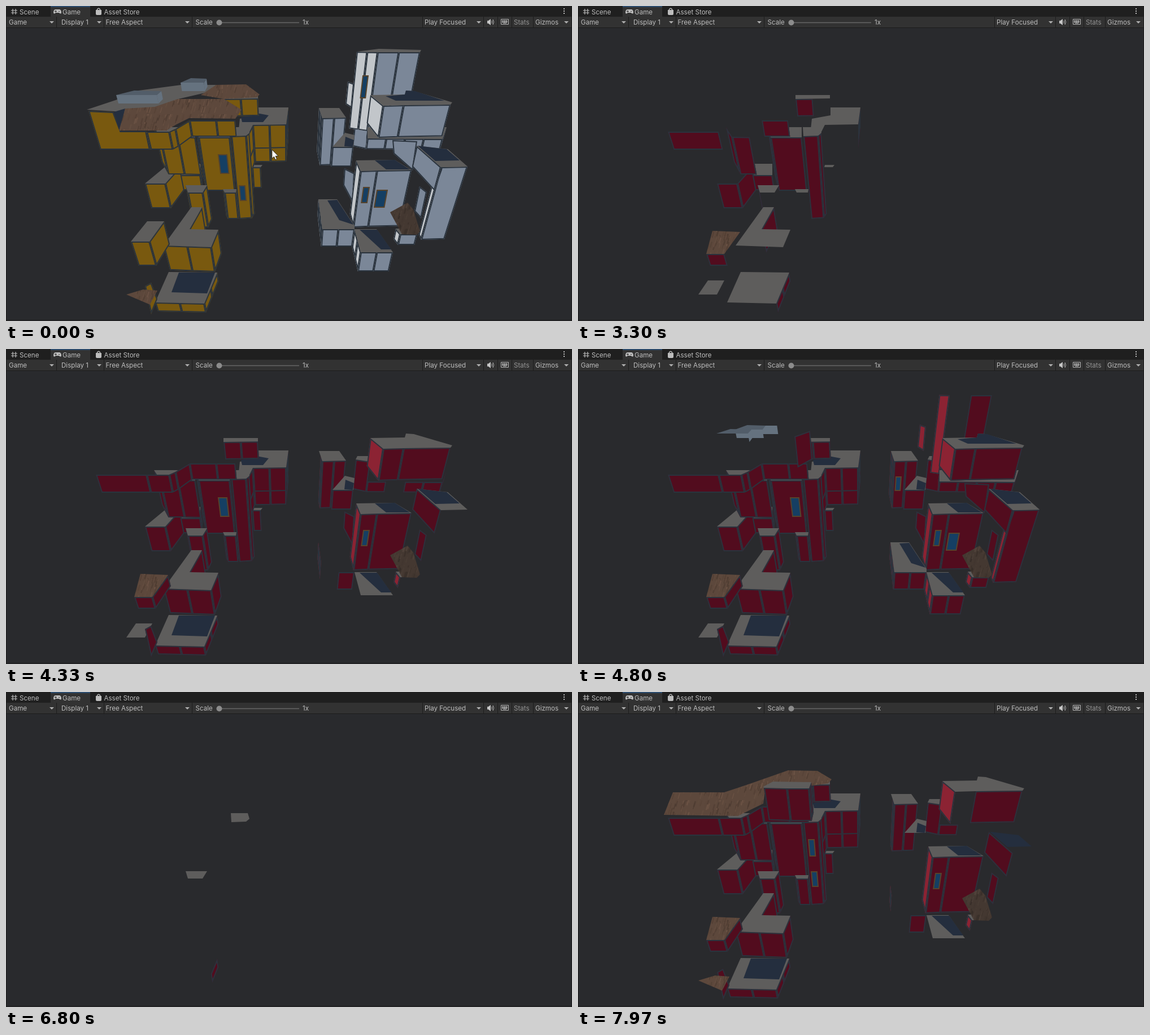
An HTML page with a canvas for the animation above (8 s loop, 1002x559 px).

```html
<!DOCTYPE html>
<html lang="en">
<head>
<meta charset="utf-8">
<title>Building generator</title>
<style>
  html, body { margin: 0; width: 100%; height: 100%; overflow: hidden; background: #292a2d; }
  canvas, svg { position: absolute; left: 0; top: 0; width: 1002px; height: 559px; }
  text { font: 11.6px Inter, sans-serif; fill: #bdbdbd; }
</style>
</head>
<body>
<canvas id="view" width="1002" height="559"></canvas>
<svg viewBox="0 0 1002 559">
  <path fill="#1f1f1f" d="M0 0H1002V20H0Z"/>
  <path fill="#323232" d="M79 0H149V20H79ZM0 19H1002V38H0Z"/>
  <path fill="#2a4a6b" d="M79 0H149V2H79Z"/>
  <path fill="none" stroke="#1c1c1c" d="M0 38.5H1002M89.5 19V38M173.5 19V38M329.5 19V38M737.5 19V38M845.5 19V38M870.5 19V38M895.5 19V38M933.5 19V38M.5 0V559M1001.5 0V559M0 557.5H1002"/>
  <path fill="none" stroke="#bdbdbd" stroke-width="1.2" d="M12 5V15M17 5V15M9 8H20M9 12H20"/>
  <path fill="#bdbdbd" d="M87 6H95Q98 7 98 12Q97 15 94 12H88Q85 15 84 12Q84 7 87 6Z"/>
  <path stroke="#333" d="M86 9.5H90M88 7.5V11.5M93 9.5H95"/>
  <path fill="#bdbdbd" d="M159 7H169V14Q169 16 167 16H161Q159 16 159 14Z"/>
  <path fill="none" stroke="#bdbdbd" stroke-width="1.4" d="M161.5 8V6Q164 2.5 166.5 6V8"/>
  <path fill="#bdbdbd" d="M987 4h2v2h-2zM987 8h2v2h-2zM987 12h2v2h-2z"/>
  <path fill="#b0b0b0" d="M77 27h8l-4 4zM161 27h8l-4 4zM317 27h8l-4 4zM833 27h8l-4 4zM988 27h8l-4 4z"/>
  <path stroke="#666" stroke-width="1.5" d="M378 29.5H519"/>
  <circle cx="377.5" cy="29.5" r="5" fill="#8c8c8c"/>
  <path fill="#c4c4c4" d="M852 26h2l4-3v11l-4-3h-2z"/>
  <path fill="none" stroke="#c4c4c4" d="M860 26Q861.5 28.5 860 31M862 24Q865 28.5 862 33"/>
  <path fill="none" stroke="#b8b8b8" d="M876.5 23.5h13v9h-13zM878 26.5h10M878 28.5h10M880 30.5h6M879.5 25v5M882.5 25v5M885.5 25v5"/>
  <text x="24" y="14.5">Scene</text>
  <text x="100" y="14.5">Game</text>
  <text x="173.5" y="14.5">Asset Store</text>
  <text x="5" y="33">Game</text>
  <text x="98" y="33">Display 1</text>
  <text x="176.5" y="33">Free Aspect</text>
  <text x="335.5" y="33">Scale</text>
  <text x="525" y="33">1x</text>
  <text x="741" y="33">Play Focused</text>
  <text x="899" y="33" style="fill:#949494">Stats</text>
  <text x="937" y="33">Gizmos</text>
  <path id="cursor" fill="#fff" stroke="#111" stroke-width=".8" d="M0 0V15.5L3.6 12.3 6 17.8 8.5 16.7 6.2 11.3H11Z"/>
</svg>
<script>
const ctx = document.getElementById('view').getContext('2d');
const cursor = document.getElementById('cursor');

let seed = 11;
const random = () => (seed = seed * 16807 % 2147483647) / 2147483647;

// Wood shingles: seeded slanted planks
function shingles(saturation, light) {
  const tile = document.createElement('canvas');
  tile.width = tile.height = 96;
  const c = tile.getContext('2d');
  c.fillStyle = `hsl(22 ${saturation}% ${light}%)`;
  c.fillRect(0, 0, 96, 96);
  for (let i = 0; i < 190; i++) {
    const x = random() * 96, y = random() * 96;
    c.strokeStyle = `hsl(22 ${saturation}% ${light - 5 + random() * 10}%)`;
    c.lineWidth = 1 + random() * 2;
    c.beginPath();
    c.moveTo(x, y);
    c.lineTo(x + 3, y - 10);
    c.stroke();
  }
  return ctx.createPattern(tile, 'repeat');
}

const colors = {
  top: '#5e5d5c', shade: '#242e3e', stone: '#65727f', lip: '#525d69', glass: '#153f63',
  tile: shingles(22, 30), bark: shingles(16, 23),
  wall: '#79590f', cool: '#7b8798', lit: '#c2c6ca',
};
const redColors = { ...colors, wall: '#520c1e', cool: '#520c1e', lit: '#8c2333' };
const panelKinds = ['wall', 'cool', 'lit'];

// Step ranges of each zone: p is the painted state, a and b are the two builds
const left = { wall: 'wall', lit: 'wall', p: [0, 0], a: [0, 24], b: [0, 24] };
const right = { wall: 'cool', lit: 'lit', p: [0, 0], a: [25, 49], b: [25, 49] };
const leftTop = { ...left, a: [50, 60], b: [25, 34] };
const rightTop = { ...right, a: [50, 60], b: [50, 60] };

const parts = [];
function add(zone, kind, points, builds) {
  const start = {}, order = random();
  for (const build of builds) {
    const [first, last] = zone[build];
    start[build] = first + Math.floor(order * (last - first + 1));
  }
  parts.push({ kind, start, path: new Path2D(`M${points.join(' ')}Z`) });
}

const parse = text => text.match(/\S+ \S+/g).map(pair => pair.split(' ').map(Number));
const face = (zone, kind, outline, builds = 'pab') => add(zone, kind, parse(outline), builds);

// World verticals meet at this vanishing point
const vanish = [500, 1280], horizon = 50;
const sink = (point, amount) => point.map((v, i) => (v + vanish[i] * amount) / (1 + amount));
const mix = (p, q, k) => p.map((v, i) => v + (q[i] - v) * k);

// Extrudes a clockwise roof outline down until its nearest corner reaches `bottom`.
// The last edge is the side that faces the light.
function block(zone, outline, bottom, { builds = 'pab', size = 38, wall = zone.wall, lit = zone.lit, roof = 'top' } = {}) {
  const points = parse(outline);
  const near = Math.max(...points.map(p => p[1]));
  const depth = (bottom - near) / (vanish[1] - bottom) / (near - horizon);
  const lower = p => sink(p, depth * (p[1] - horizon));
  const panels = [];
  points.forEach((p, i) => {
    const isLast = i === points.length - 1;
    const q = points[(i + 1) % points.length], foot = lower(p);
    const length = Math.hypot(q[0] - p[0], q[1] - p[1]);
    const facing = (q[0] - p[0]) * (foot[1] - p[1]) - (q[1] - p[1]) * (foot[0] - p[0]);
    if (facing >= 0 || length < 6) return;
    const count = Math.max(1, Math.round(length / (isLast ? size / 2 : size)));
    for (let n = 0; n < count; n++) {
      const a = mix(p, q, n / count), b = mix(p, q, (n + 1) / count);
      panels.push({ kind: isLast ? lit : wall, quad: [a, b, lower(b), lower(a)] });
    }
  });
  panels.sort((m, n) => m.quad[0][1] - n.quad[0][1]);
  for (const { kind, quad } of panels) add(zone, kind, quad, builds);
  if (roof) add(zone, roof, points, builds);
}

function pane(zone, x, y, width, bottom, builds = 'pab') {
  const amount = (bottom - y) / (vanish[1] - bottom);
  const a = [x, y], b = [x + width, y];
  add(zone, 'glass', [a, b, sink(b, amount), sink(a, amount)], builds);
}

function leftBuilding() {
  block(left, '437 282 454 282 451 286 436 286', 323);
  block(left, '447 180 500 180 496 210 437 211 428 229 411 228 414 200 447 194', 301, { roof: null });
  block(left, '447 180 500 180 496 210 437 211 428 229 411 228 414 200 447 194', 275);
  face(left, 'shade', '416 197 444 190 465 194 455 206 418 206');
  block(left, '385 158 446 158 446 164 385 165', 196);

  block(left, '298 280 344 280 344 300 300 300', 327);
  block(left, '281 286 308 286 282 315 246 315', 359);
  block(left, '262 215 330 215 335 233 273 232', 300);
  block(left, '335 215 396 215 396 233 341 233', 328);
  block(left, '384 325 408 325 407 331 387 331', 378);
  block(left, '398 215 428 215 431 225 425 230 399 231', 378);
  pane(left, 376, 264, 15, 297, 'pa');
  pane(left, 408, 262, 10, 291, 'b');
  pane(left, 413, 319, 10, 345, 'pb');

  // Overhang
  const wide = { size: 90, roof: null };
  block(left, '160 205 400 195 411 200 406 203 372 203 325 203 300 218 289 223 249 223 159 223', 255, wide);
  face(leftTop, 'top', '143 184 194 167 235 150 310 140 372 140 357 153 305 165 264 180 210 188', 'p');
  face(leftTop, 'wall', '146 186 190 188 203 222 248 222 255 255 167 255', 'p');
  face(leftTop, 'shade', '191 188 211 182 201 221', 'p');
  face(leftTop, 'tile', '372 140 425 139 449 157 444 162 385 165 345 158', 'p');
  face(leftTop, 'tile', '304 165 386 165 417 184 406 200 324 199 294 214 263 179', 'p');
  face(leftTop, 'tile', '211 182 263 179 300 211 284 221 200 221', 'p');
  face(left, 'tile', '301 164 372 139 424 140 449 155 443 162 345 176 300 190', 'b');
  face(leftTop, 'tile', '168 178 259 178 301 164 345 154 332 167 328 198 283 220 152 218', 'b');
  block(leftTop, '328 168 345 159 413 160 409 171 370 171 329 170', 229, { builds: 'b', size: 90 });
  block(leftTop, '143 181 246 154 285 137 330 131 445 137 411 145 383 155 411 158 409 171 370 171 328 170 294 185 240 186 144 184',
    255, { builds: 'a', size: 100 });

  // Chimneys
  const stone = { wall: 'stone', lit: 'stone', roof: 'lip', size: 99 };
  const chimney = (x, y, width, builds) => block(leftTop,
    `${x + width * .4} ${y - 5} ${x + width} ${y - 4} ${x + width * .9} ${y + 3} ${x} ${y + 3}`, y + 18, { ...stone, builds });
  chimney(309, 133, 46, 'p');
  chimney(195, 155, 80, 'p');
  for (let i = 2; i >= 0; i--) chimney(245 + 33 * i, 147 - 7 * i, 62 - 8 * i, 'a');

  // Lower floors
  block(left, '318 318 356 318 348 331 322 331', 393);
  block(left, '328 357 347 357 325 396 376 397 363 428 279 425', 472);
  block(left, '250 382 280 382 254 418 221 418', 461, { builds: 'p' });
  block(left, '238 399 287 401 259 440 227 440', 461, { builds: 'ab', roof: 'tile' });
  block(left, '288 472 374 473 351 528 264 526', 544);
  face(left, 'shade', '306 473 370 473 356 510 293 508');
  face(left, 'top', '230 487 259 487 246 512 213 512', 'a');
  face(left, 'wall', '246 497 257 491 268 520 257 547');
  face(left, 'tile', '213 512 243 503 268 505 255 530', 'pb');
}

function rightBuilding() {
  // Tower and the floors behind
  face(right, 'lit', '605 134 616 138 612 181 601 174');
  block(right, '622 190 650 190 645 200 619 196', 254);
  block(rightTop, '621 81 660 76 735 78 733 82 658 82', 222);
  pane(rightTop, 632, 124, 9, 163);
  block(right, '640 215 780 215 773 236 640 235', 255);
  face(right, 'cool', '684 238 728 240 720 292 686 262');
  block(right, '645 158 706 157 708 150 722 151 790 171 787 175 704 176 668 177', 234, { size: 85 });
  face(right, 'shade', '672 160 706 157 708 150 724 151 776 168 690 168');

  // Slim tower
  block(right, '554 181 590 181 602 198 560 199', 283, { size: 21 });
  block(right, '600 225 617 229 615 250 578 250', 285);
  face(right, 'shade', '601 232 616 238 614 250 599 249');
  pane(right, 563, 227, 9, 251, 'a');

  // Central block
  face(right, 'cool', '599 288 617 297 614 350 597 318');
  block(right, '620 274 688 273 718 291 657 292 628 293', 393, { size: 70 });
  face(right, 'shade', '653 274 688 273 715 290 673 290');
  pane(right, 633, 322, 10, 349);
  pane(right, 657, 327, 18, 357);

  // Outer tower
  face(right, 'cool', '732 320 745 330 735 377 723 364');
  block(right, '764 279 782 254 817 285 770 286', 415);
  block(right, '727 248 782 254 770 286', 328, { lit: 'cool', roof: null, size: 99 });
  face(right, 'top', '727 248 782 254 817 285 770 286');
  face(right, 'shade', '729 248 780 254 803 274 760 275');
  pane(rightTop, 774, 333, 14, 364, 'a');
  block(right, '690 395 730 395 728 405 698 405', 424);
  face(right, 'bark', '680 366 711 349 721 361 733 400 727 406 701 405');

  // Ground floor
  block(right, '553 343 586 343 617 390 617 396 560 396', 427);
  face(right, 'shade', '569 345 586 344 615 388 590 380');
  block(right, '617 396 656 396 685 437 628 437', 471);
  face(right, 'shade', '626 397 657 397 682 432 664 432');
}

leftBuilding();
rightBuilding();

function drawPart({ kind, path }, palette) {
  const isPanel = panelKinds.includes(kind);
  ctx.fillStyle = palette[kind];
  ctx.fill(path);
  if (isPanel) {
    ctx.save();
    ctx.clip(path);
    ctx.strokeStyle = '#2a333d';
    ctx.lineWidth = 4;
    ctx.stroke(path);
    ctx.restore();
  } else if (kind === 'glass') {
    ctx.strokeStyle = '#57432b';
    ctx.lineWidth = 2;
    ctx.stroke(path);
  }
}

function drawBuild(build, step) {
  const palette = build === 'p' ? colors : redColors;
  for (const part of parts) if (part.start[build] <= step) drawPart(part, palette);
}

// Pointer position: short moves between rests
const clamp = k => Math.min(1, Math.max(0, k));
const moves = [[0, 100, -9, 0], [470, 530, -1, -3], [1000, 1070, -10, -11]];
function drawPointer(t) {
  let x = 471, y = 255;
  for (const [from, to, dx, dy] of moves) {
    const k = clamp((t - from) / (to - from));
    x += dx * k;
    y += dy * k;
  }
  cursor.setAttribute('transform', `translate(${x} ${y})`);
  cursor.style.display = t < 1800 ? '' : 'none';
}

const stepAt = elapsed => Math.floor((elapsed + 8) * 30 / 1000);

function frame() {
  const t = performance.now() % 8000;
  ctx.fillStyle = '#292a2d';
  ctx.fillRect(0, 0, 1002, 559);
  if (t < 1800) drawBuild('p', 0);
  else if (t >= 3000 && t < 5530) drawBuild('a', stepAt(t - 3000));
  else if (t >= 6800) drawBuild('b', stepAt(t - 6800));
  drawPointer(t);
  requestAnimationFrame(frame);
}
frame();
</script>
</body>
</html>
```
